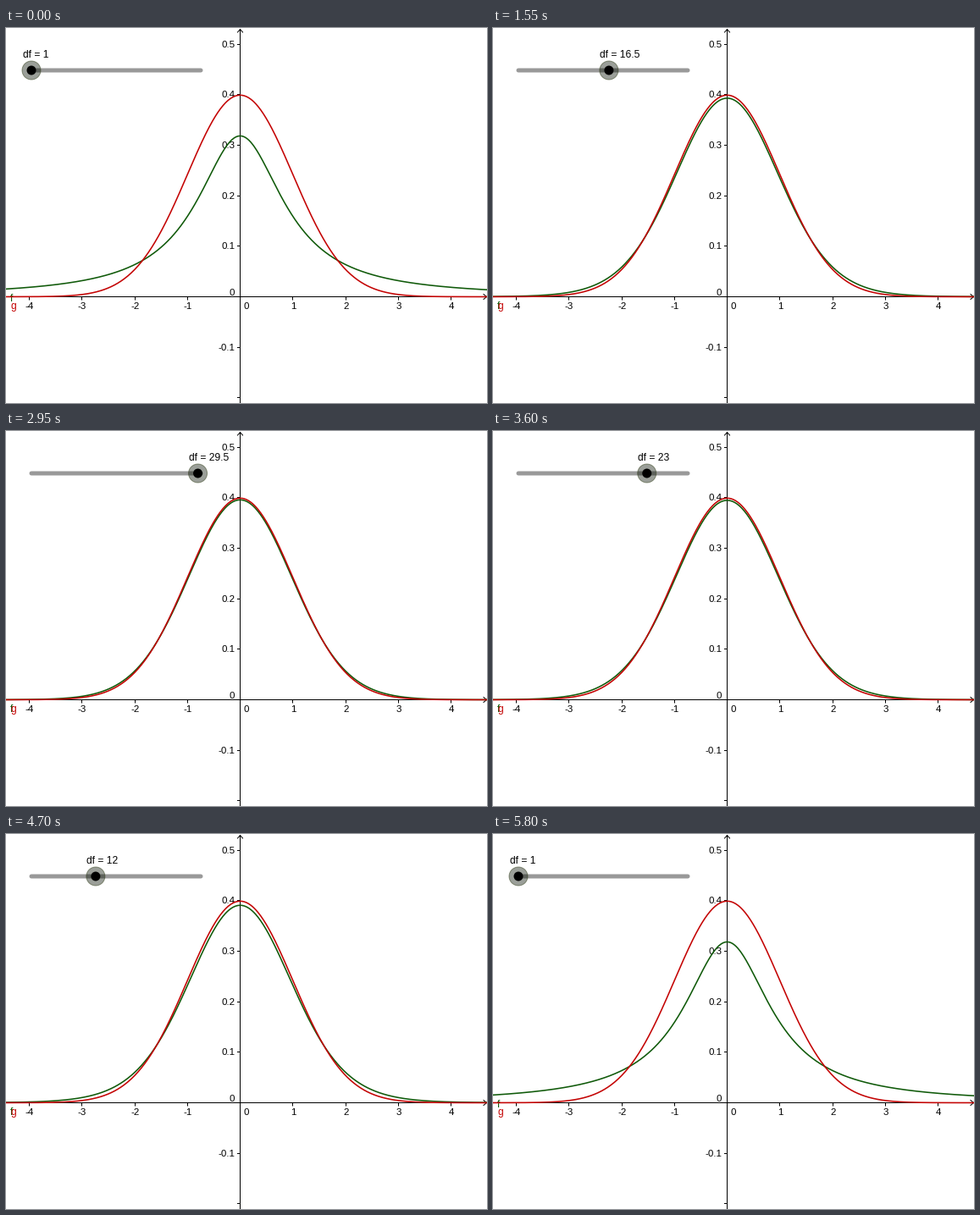
A matplotlib script for the animation above (5850 ms loop, 568x443 px).

```python
import math

import matplotlib.pyplot as plt
import numpy as np
from matplotlib.animation import FuncAnimation
from matplotlib.patches import Circle

W, H, DPI = 568, 443, 100
FRAMES, INTERVAL = 117, 50
PX = 72 / DPI                      # points per pixel
OX, OY = 276.5, 317.5              # origin of the plot on the stage
UX, UY = 62.25, 597                # pixels per unit
RED, GREEN, GREY = "#c40404", "#105a0a", "#999999"
SLIDER_Y, SLIDER_X0, SLIDER_X1 = 50, 30, 230

plt.rcParams["font.family"] = "Liberation Sans"

fig = plt.figure(figsize=(W / DPI, H / DPI), dpi=DPI, facecolor="white")
ax = fig.add_axes([0, 0, 1, 1])
ax.set_xlim(0, W)
ax.set_ylim(H, 0)
ax.axis("off")


def line(xs, ys, color="black", width=1.0, **kw):
    return ax.plot(xs, ys, color=color, lw=width * PX, snap=False, **kw)[0]


def label(x, y, text, size=11.5, ha="center", color="black", z=3):
    return ax.text(x, y, text, fontsize=size * PX, ha=ha, va="baseline",
                   color=color, zorder=z)


def student_t(x, df):
    log_c = math.lgamma((df + 1) / 2) - math.lgamma(df / 2)
    c = math.exp(log_c) / math.sqrt(df * math.pi)
    return c * (1 + x * x / df) ** (-(df + 1) / 2)


def degrees(frame):
    """Climb from 1 to 30 in steps of 0.5, then return."""
    half = FRAMES // 2
    return 30 - 0.5 * abs(frame - half)


def draw_axes():
    line([0, W], [OY, OY])
    line([OX, OX], [2, H])
    line([W - 4, W - 0.5, W - 4], [OY - 3, OY, OY + 3])
    line([OX - 3, OX, OX + 3], [5, 1.5, 5])
    for n in range(-4, 5):
        x = math.floor(OX + n * UX) + 0.5
        if n:
            line([x, x], [OY, OY + 3.5])
            label(x + 0.5, 332, str(n))
    for n in range(-2, 6):
        y = math.floor(OY - n * UY / 10) + 0.5
        if n:
            line([OX - 3, OX], [y, y])
        if n > -2 and n:
            label(270.5, y + 3.5, f"{n / 10:.1f}", ha="right")
    label(284, 332, "0")
    label(270, 316, "0", ha="right")


draw_axes()

px = np.linspace(-2, W + 2, 573)
xs = (px - OX) / UX
normal = np.exp(-xs ** 2 / 2) / math.sqrt(2 * math.pi)
t_curve = line(px, px * 0, GREEN, 1.6, zorder=4)
line(px, OY - UY * normal, RED, 1.6, zorder=5)
f_label = label(5, 331, "f", 12, "left", GREEN, 4)
label(5, 332, "g", 12, "left", RED, 5)

line([SLIDER_X0, SLIDER_X1], [SLIDER_Y] * 2, GREY, 5,
     solid_capstyle="round", zorder=6)
halo = Circle((0, SLIDER_Y), 11, fc=(0.02, 0.06, 0, 0.4),
              ec=(0.2, 0.25, 0.1, 0.5), lw=PX, zorder=7)
dot = Circle((0, SLIDER_Y), 5.5, fc="black", ec="none", zorder=8)
ax.add_patch(halo)
ax.add_patch(dot)
df_label = label(0, 35, "", 12, "left", z=9)


def update(frame):
    df = degrees(frame)
    t_curve.set_ydata(OY - UY * student_t(xs, df))
    f_label.set_y(332 - UY * student_t(-4.4, df))
    x = SLIDER_X0 + (SLIDER_X1 - SLIDER_X0) * (df - 1) / 29
    halo.center = dot.center = (x, SLIDER_Y)
    df_label.set_x(x - 10.5)
    df_label.set_text(f"df = {df:g}")
    return t_curve, f_label, halo, dot, df_label


anim = FuncAnimation(fig, update, frames=FRAMES, interval=INTERVAL,
                     repeat=True, repeat_delay=0)
plt.show()
```
